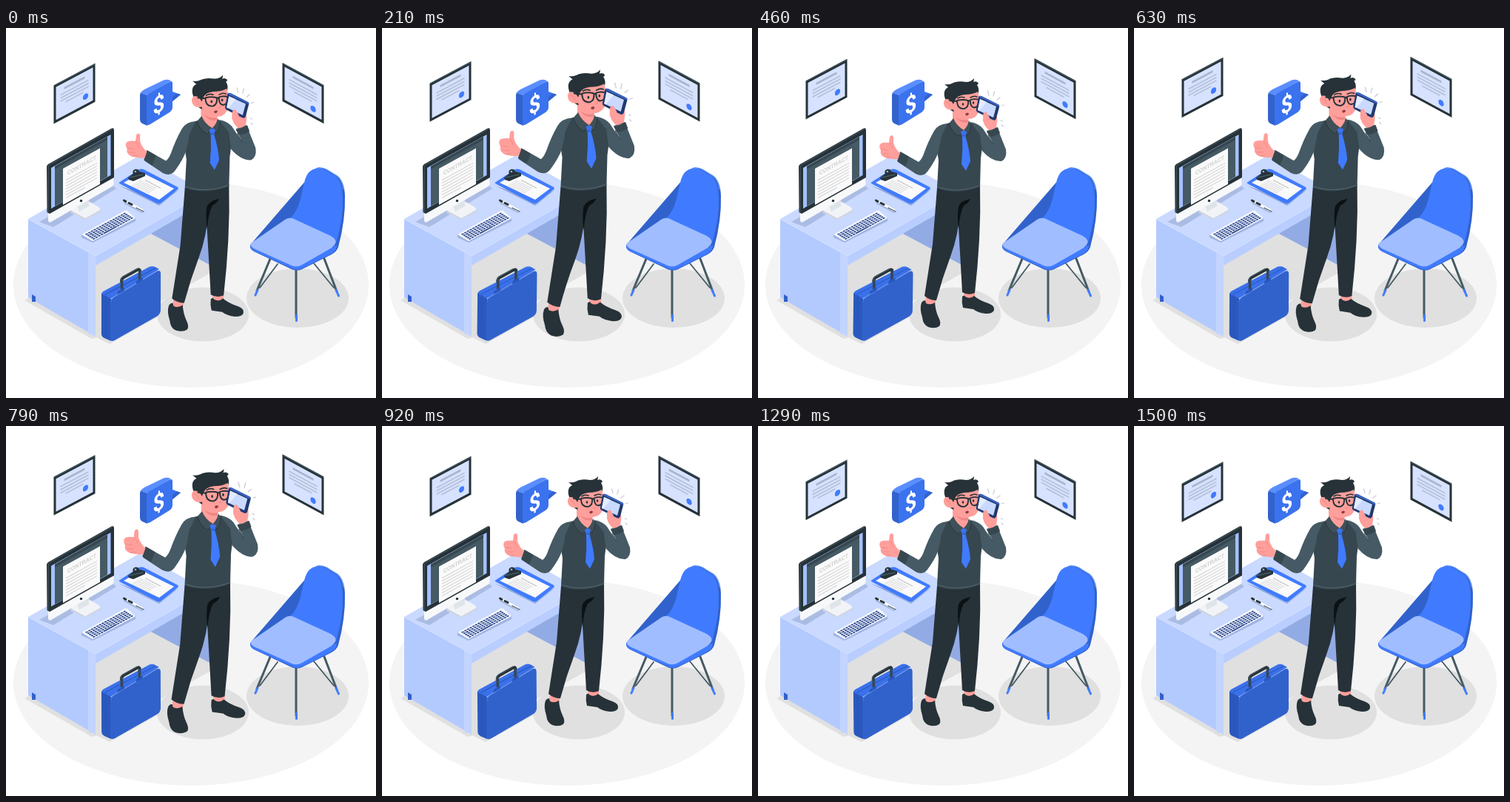
Recreate the animation shown at these times as an HTML page with a canvas. Size 500 px wide and 500 px high, loop 1.54 s.

```html
<!DOCTYPE html>
<html lang="en">
<head>
<meta charset="utf-8">
<title>Office call</title>
<style>
html, body { margin: 0; width: 100%; height: 100%; overflow: hidden; background: #fff; }
canvas { display: block; width: 100vw; height: 100vh; }
</style>
</head>
<body>
<canvas id="stage" width="500" height="500"></canvas>
<script>
const ctx = document.getElementById('stage').getContext('2d');
const LOOP = 1540, STEPS = 37;
const BLUE = '#407bff', DEEP = '#3162cc', INK = '#263238', SLATE = '#37474f',
      STEEL = '#455a64', SKIN = '#ff9f9b', SKIN_DARK = '#ee8583', SHADE = '#e0e0e0';

const paths = new Map();
function path(d) {
  if (!paths.has(d)) paths.set(d, new Path2D(d));
  return paths.get(d);
}
function fill(color, d) {
  ctx.fillStyle = color;
  ctx.fill(path(d));
}
function line(color, width, d) {
  ctx.strokeStyle = color;
  ctx.lineWidth = width;
  ctx.lineCap = ctx.lineJoin = 'round';
  ctx.stroke(path(d));
}
function oval(color, x, y, rx, ry = rx, turn = 0) {
  ctx.fillStyle = color;
  ctx.beginPath();
  ctx.ellipse(x, y, rx, ry, turn, 0, Math.PI * 2);
  ctx.fill();
}
function rect(color, x, y, w, h) {
  ctx.fillStyle = color;
  ctx.fillRect(x, y, w, h);
}
// Draws inside a plane whose axes are (a, b) and (c, d).
function plane(a, b, c, d, x, y, draw) {
  ctx.save();
  ctx.transform(a, b, c, d, x, y);
  draw();
  ctx.restore();
}
function about(x, y, scale, degrees, draw) {
  ctx.save();
  ctx.translate(x, y);
  ctx.rotate(degrees * Math.PI / 180);
  ctx.scale(scale, scale);
  ctx.translate(-x, -y);
  draw();
  ctx.restore();
}
// Linear keyframes: [position, value] pairs.
function track(p, keys) {
  for (let i = 1; i < keys.length; i++) {
    const [p0, v0] = keys[i - 1], [p1, v1] = keys[i];
    if (p <= p1) return v0 + (v1 - v0) * (p - p0) / (p1 - p0);
  }
  return keys[keys.length - 1][1];
}
const FLOAT = [[0, 0], [.5, -10], [1, 0]];
const BEAT = [[0, 1], [.1, 1.1], [.3, 1], [.4, 1], [.5, 1.1], [.6, 1], [1, 1]];
const SWING = [[0, 0], [.25, 1], [.75, -1], [1, 0]];

function floor() {
  oval('#f4f4f4', 250, 347, 240, 139);
  oval(SHADE, 266, 387, 62, 36.5);
  oval(SHADE, 394, 365, 69, 40);
  fill(SHADE, 'M25 368L114 419Q118 421 123 418L285 326 195 273Z');
  fill(SHADE, 'M122 418L140 427 213 386 200 370Z');
}

function certificate(x, y, slope, dotX, dotY) {
  plane(1, slope, 0, 1, x, y, () => {
    rect(INK, 0, 0, 56, 52);
    rect(STEEL, 1.5, 0, 54, 1.4);
    rect('#d6e2ff', 3, 4, 50, 44.5);
    rect('#a9b5cb', 14, 10, 28, 3);
    for (let i = 0; i < 4; i++)
      rect('#b3bfd6', i == 3 ? 16 : 9, 17 + i * 4.3, i == 3 ? 24 : 38, 1.8);
    oval(BLUE, dotX, dotY, 3.6, 4);
  });
}

function desk() {
  fill('#93abe4', 'M194 277L246 246 277 263V321Z');
  fill('#c9d9ff', 'M30 258L181 172 272 223 121 308Z');
  fill('#b3caff', 'M30 258L121 308V416L111 411 30 364Z');
  fill('#c3d4ff', 'M111 303L121 308V417L111 413Z');
  fill('#b9ceff', 'M121 308L272 222V234L121 321Z');
  fill(DEEP, 'M35 360L40 363V370L35 370Z');
  line('#d8e4ff', .8, 'M30.5 258.5L121 308 240 240');
}

function monitor() {
  fill('#abbce4', 'M45 262L140 209 149 217 100 247 64 269Z');
  fill('#cfd5e2', 'M87 248L111 236 129 246Q129 249 107 259L88 250Z');
  fill('#f1f3f6', 'M87 246L111 234Q130 243 127 246L107 257Z');
  fill('#dfe3ea', 'M94 235L112 226V241L99 248Z');
  fill('#f7f8fa', 'M57 249L145.5 201V211Q145 214 142 215L61 262Q57 264 57 259Z');
  fill(INK, 'M55 188Q55 185 58 183.5L142 136Q146 134 146 138V202L59 251 55.5 249Z');
  line(STEEL, 1, 'M57 249V188Q57 186 60 184L143 137');
  fill('#a4c0ff', 'M61 189L141.5 144V199L61 244Z');
  fill(STEEL, 'M66 187L137 147V201L66 241Z');
  fill(SLATE, 'M66 187L137 147V151L66 191Z');
  fill('#fafafa', 'M77 190L127 162.500V211L77 239Z');
  oval(INK, 101.500, 233.500, 1.7);
  plane(.866, -.48, 0, 1, 83, 199, () => {
    ctx.fillStyle = '#cfcfcf';
    ctx.font = 'bold 8px "Liberation Sans", Arial, sans-serif';
    ctx.fillText('CONTRACT', 0, 0);
  });
  plane(1, -.55, 0, 1, 81, 205, () => {
    for (let i = 0; i < 7; i++)
      rect('#d2d2d2', 0, i * 4, i == 6 ? 26 : 42, 1.2);
  });
}

function keyboard() {
  fill('#9fb4e2', 'M102 279L161 248 175 257V261L117 290 102 283Z');
  fill('#f7f8fc', 'M102 279L160 247Q162 246 164 247L175 257 117 288Z');
  plane(58, -31.500, 14, 9, 103.5, 279, () => {
    for (let row = 0; row < 5; row++)
      for (let col = 0; col < 15; col++) {
        if (row == 4 && col > 3 && col < 9) continue;
        rect('#2d4a91', .035 + col * .063, .09 + row * .175, .046, .12);
      }
    rect('#2d4a91', .287, .79, .305, .12);
  });
}

function clipboard() {
  fill('#8da7df', 'M153 213L207 240 233 219 207 232Z');
  fill(BLUE, 'M153 210Q152 209 154 208L180 191Q183 190 186 191L232 215Q234 217 231 219L210 236Q207 238 204 237Z');
  fill('#fafafa', 'M159 209L183 195 227 217 207 232Z');
  plane(.9, .46, -.82, .55, 184, 200, () => {
    rect('#c5c5c5', 8, 3, 23, 1.4);
    for (let i = 0; i < 6; i++) rect('#d5d5d5', 3, 7 + i * 2.7, 25, 1);
  });
  fill(INK, 'M165 202L172 197Q170 193 174 191 179 190 180 194L188 196 188 200 172 207 166 205Z');
  line(STEEL, 1.3, 'M167 202L185 198');
  oval('#9db8f5', 175, 194, 1.3);
}

function pen() {
  line('#9fb1dc', 2, 'M160 236L184 249');
  line('#fafafa', 3.2, 'M162 234L184 246.5');
  line(INK, 3, 'M159.5 233L162 234.3M166 236.500L170 238.500');
  line(STEEL, 1.2, 'M176 243L186 248');
}

function bubble() {
  fill(DEEP, 'M181 91Q181 87 185 85L191 91V132L184 129Q181 127 181 124Z');
  fill('#5a8dff', 'M182 88Q183 85 187 83L213 70.500Q217 69 223 71L190 91Z');
  fill('#3b72ee', 'M190 94Q190 90 194 88L220 73Q225 70 225 75V86L236 90 225 99V107Q225 111 221 114L195 130Q190 133 190 128Z');
  fill(DEEP, 'M225 99L236 90 231 88.5 225 93Z');
  plane(.866, -.45, 0, 1, 207, 103, () => {
    ctx.fillStyle = '#fff';
    ctx.font = 'bold 32px Roboto, "Liberation Sans", sans-serif';
    ctx.textAlign = 'center';
    ctx.fillText('$', -.5, 11);
    ctx.textAlign = 'left';
  });
}

function briefcase() {
  line(INK, 4, 'M156 353V342Q156 339 159 337L177 327Q181 325 181 329V341');
  line(STEEL, 1.2, 'M155 352V341Q155 338 158 336L177 325.500');
  fill('#3a70ea', 'M129 360Q129 357 133 355L194 322.500Q198 321 202 323L207 326 141 366 133 363Z');
  fill('#2a58bd', 'M129 359L142 366V423L133 419Q129 417 129 413Z');
  fill(DEEP, 'M141 370Q141 367 145 364L203 329Q209 326 209 332V381Q209 386 205 389L147 422Q141 425 141 419Z');
  line('#2a56b8', 1, 'M135 362V419M134 360L202 324.500');
  line('#4a7fe9', .8, 'M142 370Q142 367 146 364L203 329.500');
  line(SLATE, 3.6, 'M156.500 341V352M180.500 329V341');
  fill('#2857bd', 'M151 356L160 351V355L151 360ZM176 342L185 337V341L176 346Z');
}

function chair() {
  line(STEEL, 3, 'M357 312L339 355M392 322V391M429 309L447 356');
  line(STEEL, 1.8, 'M367 319L343 351M416 318L443 351');
  line(BLUE, 3, 'M340 354L337 361M392.500 388V395.500M446 354L449.500 362');
  fill(DEEP, 'M420 189Q424 188 430 190L447 199Q457 206 458 226 459 259 449 296 447 302 440 306L400 326Q393 329 386 326L335 302Q329 299 330 293Z');
  fill(BLUE, 'M418 190Q425 188 435 194L446 201Q454 208 455 229 456 257 446 291L383 258Q393 250 398 231L404 205Q408 192 418 190Z');
  line('#5f91ff', 1.3, 'M420 189.500Q425 188 433 191L447 200Q454 205 456 218');
  fill(BLUE, 'M330 293Q330 299 336 302L387 325Q393 328 400 325L440 305Q447 301 447 293L393 321Z');
  fill('#a0bdff', 'M332 290L377 259Q383 255 389 258L439 281Q449 287 444 293 441 297 435 300L400 320Q393 324 386 321L337 299Q327 294 332 290Z');
}

function legs() {
  fill(SKIN, 'M227 361L241 365 239 375 226 373ZM278 355L293 355 293 365 279 366Z');
  fill(INK, 'M221 371Q223 368 226 368L227 372Q233 375 239 371 240 383 244 391 248 399 245 403 239 407 230 404 223 401 222 391 218 379 221 371Z');
  fill(INK, 'M276 363Q279 360 280 363 286 367 292 362 299 368 311 372 320 375 319 381 318 386 308 386 297 385 291 380L277 378Q275 371 276 363Z');
  fill(INK, 'M264 216L300 212Q301 249 299 286 297 323 293 358 284 362 276 357L271 269Z');
  fill(INK, 'M242 216L290 217 287 231Q275 235 273 246 271 280 260 309 249 338 241 368 232 368 225 362L236 292Z');
  fill('#0b1114', 'M287 231Q275 233 271 241 269 253 271 271 273 249 278 240 284 237 287 231Z');
}

function torso() {
  fill(SLATE, 'M256 129Q263 126 284 127 299 129 303 138 304 157 301 176L300 214Q287 220 269 221 250 221 242 216L244 179 239 146Q241 134 256 129Z');
  line('#52656d', 1, 'M243 215Q270 224 300 213');
  fill(STEEL, 'M256 129Q243 130 238 139 230 153 224 170 221 178 217 181L194 168 189 181 213 197Q223 202 229 194 240 179 244 167L248 146Z');
  fill(SLATE, 'M192 167L204 174 199 187 188 180Z');
  fill(SKIN, 'M192 169Q185 163 183 155L183 147Q181 143 178 147L177 155Q168 154 165 157 163 161 166 165 164 171 171 175 181 178 189 177Z');
  line(SKIN_DARK, .8, 'M178 156Q181 159 182 163M166 164L175 165M169 170L177 170M173 175L179 174');
}

function callArm() {
  fill(STEEL, 'M287 127Q298 129 304 136 311 147 317 155L309 139 323 134Q329 149 335 164 337 176 329 180 316 181 302 165L300 144Z');
  fill(SLATE, 'M309 140Q317 139 324 134L327 142Q320 147 313 147Z');
  line('#32434b', 1, 'M317 156Q314 151 311 145M302 163L299 151');
  fill(SKIN, 'M305 115Q309 111 315 117L323 119Q324 126 322 134 317 138 312 138 305 132 304 124Z');
}

function phone() {
  fill('#20396f', 'M298 93Q299 91 302 92L324 103Q327 104 326 107L322 122Q321 126 317 124L297 114Q294 112 295 109Z');
  fill('#3b65c4', 'M298 93Q299 91 302 92L324 103Q327 104 326 107L323 105 300 94Z');
  fill('#c9d9ff', 'M300 96L322 106 318 121 297 111Z');
  fill('#e4ecff', 'M300 96L309 100 299 112 297 111Z');
  fill(SKIN, 'M304 118Q305 112 309 114L313 121 310 128 304 126Z');
  line('#cdccda', 1.3, 'M310.500 85L312 91M319.500 86L318 92M327 94L323 97M332.500 104L329.500 105M328 125L330.500 126M329 131L331 133');
}

function head() {
  fill(SKIN, 'M263 111L285 119 284 132 278 139Q268 137 263 127Z');
  fill(SKIN_DARK, 'M267 120Q274 126 284 124V127Q274 130 267 120Z');
  fill(INK, 'M253 96Q249 84 257 80L252 76Q258 77 262 75 269 71 281 73 288 73 292 68 292 71 291 73 296 71 298 75L296 77Q300 83 297 90L287 97 265 113Q259 112 257 105Z');
  fill(SKIN, 'M266 98Q269 91 279 90 290 90 297 86 300 95 299 107 299 118 290 122 279 125 271 120 265 117 264 110 256 112 252 106 249 99 254 96 260 95 264 103Z');
  line(SKIN_DARK, .9, 'M254 100Q258 100 260 106M287 104Q290 109 288 111L285.500 111');
  line(INK, 1.6, 'M270 95Q274 92 279 94M287 94Q292 91 296 93');
  oval(INK, 277, 103, 1.3, 1.8);
  oval(INK, 291, 101, 1.3, 1.8);
  line(INK, 1.9, 'M269 98Q277 96 284 98 285 107 279 109 269 110 269 98ZM286.500 97.500Q292 95 299 97 299 107 292 107.500 287 107 286.500 97.500ZM284 99Q285 98 287 99M269 99L259 98');
  fill('#8f3c40', 'M280 116Q284 113 285 116 284 119 281 118Z');
}

function collarAndTie() {
  fill('#3f5058', 'M258 129L264 122Q268 132 278 138L271 146Q261 140 258 129Z');
  fill('#3f5058', 'M278 138Q284 132 285 125L288 130Q288 140 283 145Z');
  line(INK, .8, 'M258 129Q261 140 271 146L278 139 283 145Q288 139 288 130');
  fill(BLUE, 'M276 145L280 145Q286 165 287 180L281 193 275 184Q277 165 276 145Z');
  fill(DEEP, 'M274 140Q278 137 282 140L281 146Q277 148 275 145Z');
  fill('#3b72ee', 'M274 140Q278 137 282 140L280 145 275 144Z');
}

function man() {
  legs();
  torso();
  callArm();
  head();
  collarAndTie();
  phone();
}

function draw(p) {
  rect('#fff', 0, 0, 500, 500);
  const lift = track(p, FLOAT);
  floor();
  certificate(64.5, 78 + lift, -.53, 43, 38);
  certificate(373.5, 47.5 + lift, .54, 41.5, 40);
  desk();
  monitor();
  keyboard();
  clipboard();
  pen();
  bubble();
  about(169, 373, 1, track(p, SWING), briefcase);
  chair();
  about(250, 237, track(p, BEAT), 0, man);
}

function tick(now) {
  const step = Math.floor((now % LOOP) / LOOP * STEPS + .1) % STEPS;
  draw((step + 1) / STEPS);
  requestAnimationFrame(() => tick(performance.now() - start));
}
const start = performance.now();
tick(0);
</script>
</body>
</html>
```
